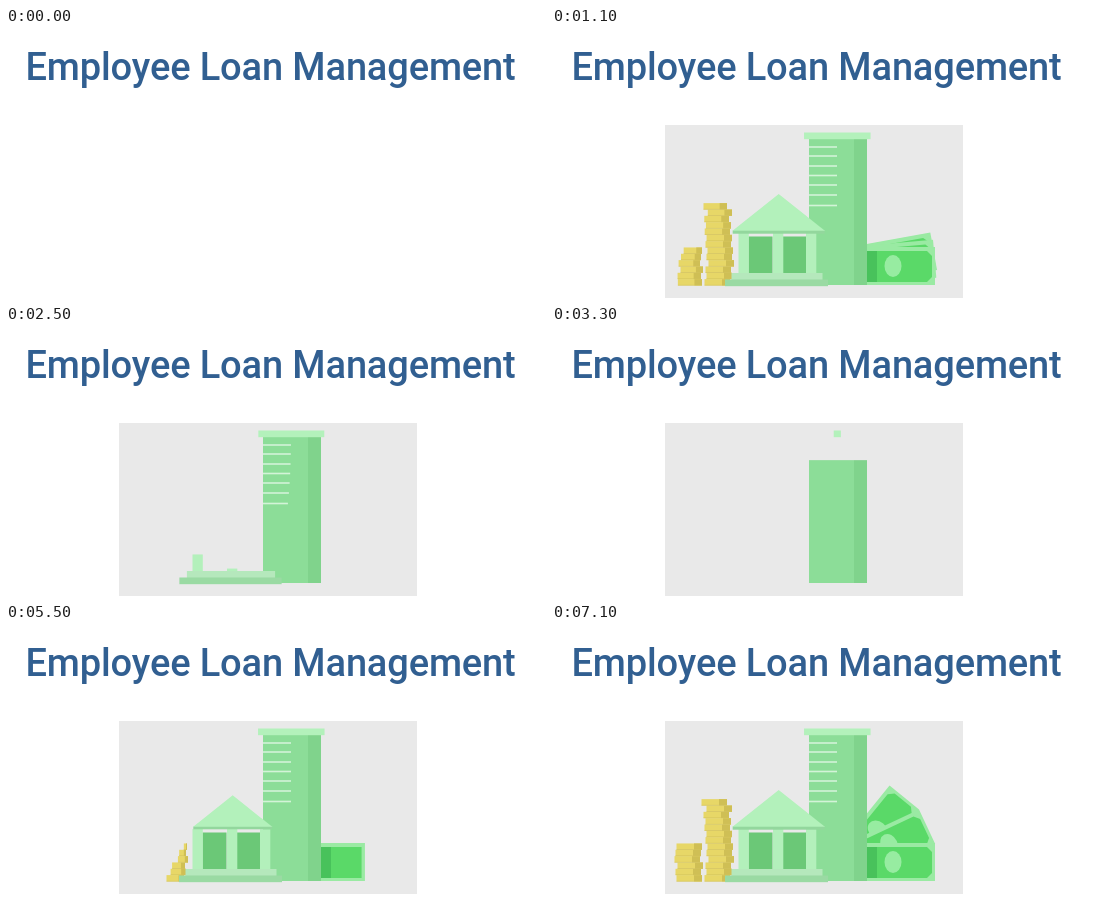
Animation, 540 px wide and 270 px high, one loop 7.3 s. Source, as an HTML page:

```html
<!DOCTYPE html>
<html lang="en">
<head>
<meta charset="utf-8">
<title>Employee Loan Management</title>
<style>
html, body { margin: 0; width: 100%; height: 100%; overflow: hidden; background: #fff; }
svg { display: block; width: 100vw; height: 100vh; }
text { font: 500 38px Roboto, "Open Sans", sans-serif; letter-spacing: -0.15px; fill: #315f91; }
</style>
</head>
<body>
<svg id="stage" viewBox="0 0 540 270">
  <rect width="540" height="270" fill="#fff"/>
  <text x="19.5" y="52">Employee Loan Management</text>
  <g id="scene">
    <rect x="113" y="97" width="298" height="173" fill="#e9e9e9"/>
    <g id="bills"></g>
    <g id="tower"></g>
    <g id="coins"></g>
    <g id="bank"></g>
  </g>
</svg>
<script>
const LOOP = 7300, STEP = 200, FIRST = 100, TURN = 3722, GROW = 920;
const $ = id => document.getElementById(id);

function add(parent, tag, attrs) {
  const el = document.createElementNS("http://www.w3.org/2000/svg", tag);
  set(el, attrs);
  parent.appendChild(el);
  return el;
}
function set(el, attrs) {
  for (const k in attrs) el.setAttribute(k, attrs[k]);
}
const box = (parent, x, y, width, height, fill) =>
  add(parent, "rect", { x, y, width, height, fill });

const unit = v => Math.max(0, Math.min(1, v));
const cubic = (s, start, span = GROW) => 1 - (1 - unit((s - start) / span)) ** 3;
const quad = (s, start, span) => 1 - (1 - unit((s - start) / span)) ** 2;

// rectangles that grow from their centre or from their foot
const spread = (el, mid, full, k) => set(el, { x: mid - full * k / 2, width: full * k });
const rise = (el, foot, full, k) => set(el, { y: foot - full * k, height: full * k });

// Banknotes, drawn back to front around one pivot
const PIVOT = { x: 300, y: 238 };
const bills = [51, 25.2, 0].map(angle => {
  const g = add($("bills"), "g", {});
  return {
    g, angle,
    paper: box(g, 0, -19, 0, 38, "#9aeaa3"),
    print: add(g, "path", { fill: "#5ad968" }),
    seal: add(g, "ellipse", { cx: 41, cy: 0, fill: "#97eca1" })
  };
});
const shade = box($("bills"), 315, 223, 0, 31, "#48c25b");

// Tower
const wall = box($("tower"), 257, 111, 45, 146, "#8cdd98");
const side = box($("tower"), 302, 111, 13, 146, "#80d38c");
const cap = box($("tower"), 252, 104.5, 66, 6.7, "#b3f1bb");
const lines = [119, 128, 138, 147.5, 157, 167, 177.5].map(y =>
  box($("tower"), 257, y - 0.8, 0, 1.6, "#d3f3d8"));

// Coin stacks: right edges listed from the bottom coin up
function stack(edges, start) {
  return edges.map((edge, i) => {
    const g = add($("coins"), "g", {});
    box(g, -25.5, 0, 25.5, 6.35, "#e7d767");
    box(g, -8, 0, 8, 6.35, "#cfbf55");
    box(g, -25.5, 5.75, 25.5, 0.6, "#d0c05a");
    return { g, edge, y: 251.1 - 6.33 * i, start: start + 51 * i };
  });
}
const coins = [
  ...stack([178, 180, 179, 182, 180, 181, 179, 180, 178, 179, 177, 180, 175], 1483),
  ...stack([150, 149, 151, 148, 149, 150], 2050)
];

// Bank
const panels = [196.5, 231].map(x => box($("bank"), x, 245, 24, 0, "#6bc877"));
const columns = [186.5, 221, 254].map(x => box($("bank"), x, 245, 10.3, 0, "#b3f0bb"));
const roof = add($("bank"), "g", {});
add(roof, "path", { d: "M-46.5 0L0-37L46.5 0Z", fill: "#b3f1bb" });
box(roof, -46, -0.3, 92, 3, "#93d79d");
const plinth = box($("bank"), 180, 245, 90, 7, "#b5e8bc");
const base = box($("bank"), 173, 251.5, 103, 6.7, "#9adaa3");

function drawBills(s) {
  const w = 83 * cubic(s, 1470);
  const fan = cubic(s, 2556);
  const mark = cubic(s, 1900, 500);
  const inner = Math.max(0, w - 3);
  const cut = Math.min(inner, 5 * mark);
  for (const b of bills) {
    set(b.g, {
      transform: `translate(${PIVOT.x} ${PIVOT.y}) rotate(${-b.angle * fan})`,
      visibility: w > 0 ? "visible" : "hidden"
    });
    set(b.paper, { width: w });
    set(b.print, {
      d: `M0-15H${inner - cut}L${inner} ${cut - 15}V${16 - cut}L${inner - cut} 16H0Z`
    });
    set(b.seal, { rx: 8.5 * mark, ry: 11 * mark });
  }
  set(shade, { width: Math.max(0, Math.min(10, PIVOT.x + inner - 315)) });
}

function drawTower(s) {
  const k = cubic(s, 0);
  rise(wall, 257, 146, k);
  rise(side, 257, 146, k);
  spread(cap, 285.3, 66.5, quad(s, 370, 940));
  lines.forEach((el, i) => set(el, { width: 28 * cubic(s, 430 + 52 * i) }));
}

function drawBank(s) {
  spread(base, 224.5, 103, cubic(s, 480));
  spread(plinth, 225, 91, cubic(s, 590));
  columns.forEach((el, i) => rise(el, 245.3, 40.3, cubic(s, 1123 + 85 * i, 600)));
  panels.forEach((el, i) => rise(el, 245.3, 36.8, cubic(s, 1260 + 60 * i, 420)));
  set(roof, { transform: `translate(226.7 203) scale(${cubic(s, 1340)})` });
}

function drawCoins(s) {
  for (const c of coins)
    set(c.g, { transform: `translate(${c.edge} ${c.y}) scale(${cubic(s, c.start)} 1)` });
}

function render(t) {
  const shown = t >= FIRST;
  set($("scene"), { visibility: shown ? "visible" : "hidden", opacity: shown ? 1 : 0 });
  if (!shown) return;
  // held in steps; the build-up mirrors the take-down around TURN
  const held = FIRST + STEP * Math.floor((t - FIRST) / STEP);
  const s = Math.abs(held - TURN);
  drawBills(s);
  drawTower(s);
  drawCoins(s);
  drawBank(s);
}

const begin = performance.now();
function tick() {
  render((performance.now() - begin) % LOOP);
  requestAnimationFrame(tick);
}
tick();
</script>
</body>
</html>
```
